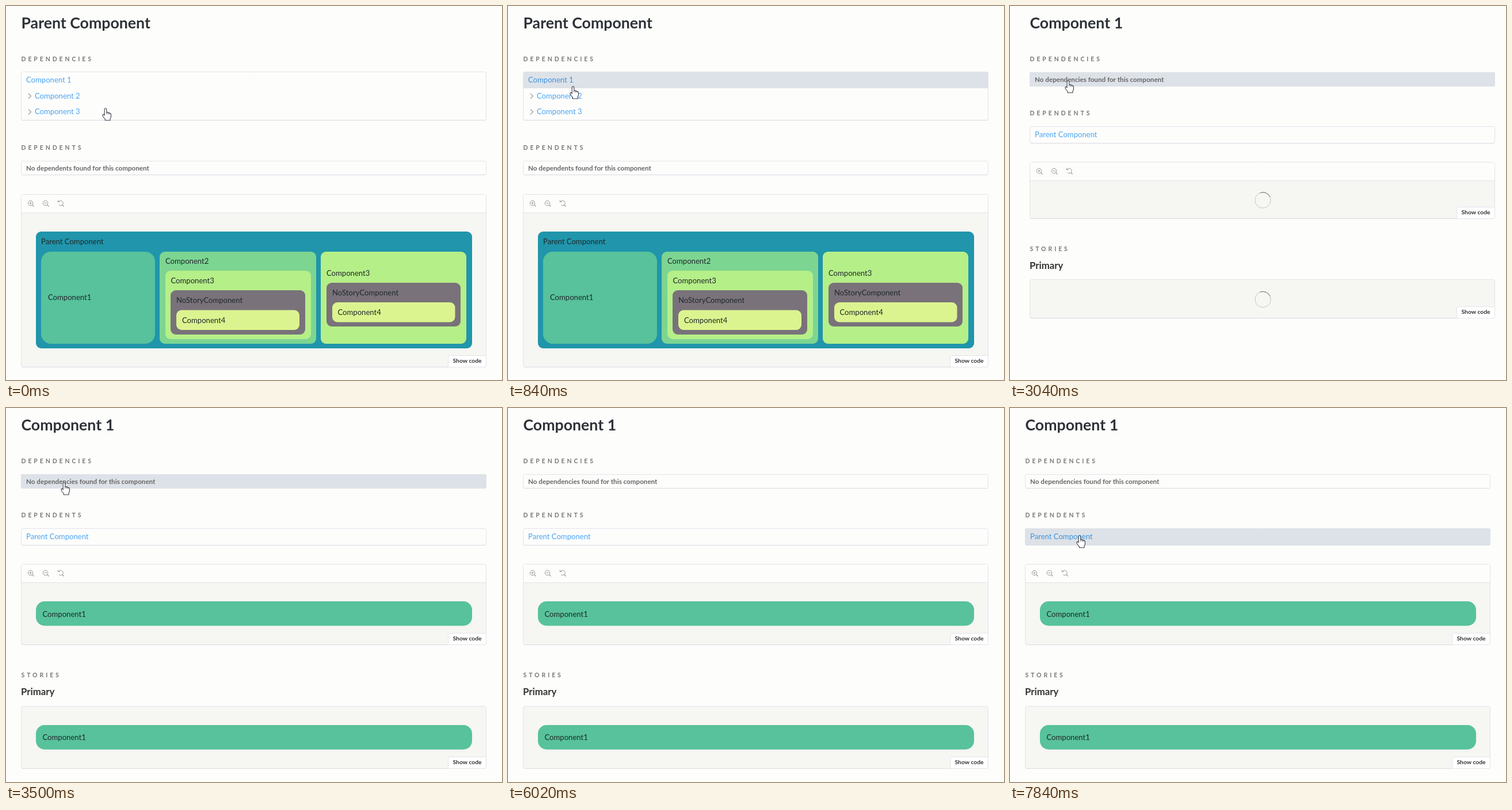
An HTML page with a canvas that plays this animation: 862 by 650 pixels, repeating every 8000 ms.

```html
<!DOCTYPE html>
<html lang="en">
<head>
<meta charset="utf-8">
<title>Component dependencies</title>
<style>
html, body { margin: 0; width: 100%; height: 100%; overflow: hidden; background: #fdfdfb; }
canvas { display: block; }
</style>
</head>
<body>
<canvas id="stage" width="862" height="650"></canvas>
<script>
const ctx = document.getElementById('stage').getContext('2d');
const LOOP = 8000;
const FONT = 'Lato, "Open Sans", sans-serif';
const C = {
  page: '#fdfdfb', panel: '#f6f6f3', card: '#fdfdfc', border: '#e4e4ec', shade: '#d9d9e4',
  hover: '#dde2e8', ink: '#2e3238', text: '#333333', muted: '#666666', label: '#777777',
  link: '#4ba5f2', linkHover: '#3f92dc', icon: '#999999',
  teal: '#2095ab', sea: '#57c29b', green: '#7dd592', lime: '#b5ef88', gray: '#79727a', lemon: '#dcf48f'
};

// time, x, y of the fingertip
const PATH = [
  [0, 173, 178], [120, 173, 178], [400, 121, 147], [540, 121, 147], [1240, 101, 130],
  [5020, 101, 130], [5300, 70, 150], [5720, -20, 196], [6139, -20, 225],
  [6140, 116, 224], [7260, 116, 224], [7800, 121, 222]
];

let now = 0, tip = { x: 0, y: 0 };

function cursorAt(t) {
  const s = Math.max(0, Math.floor((t - 120) / 140) * 140 + 120);
  let i = PATH.length - 1;
  while (i > 0 && PATH[i][0] > s) i--;
  const a = PATH[i], b = PATH[i + 1] || a;
  const k = b === a ? 0 : (s - a[0]) / (b[0] - a[0]);
  return { x: a[1] + (b[1] - a[1]) * k, y: a[2] + (b[2] - a[2]) * k };
}

function text(str, x, y, size, color, weight = 400, spacing = 0) {
  ctx.font = `${weight} ${size}px ${FONT}`;
  ctx.letterSpacing = spacing + 'px';
  ctx.fillStyle = color;
  ctx.fillText(str, x, y);
}

function box(x, y, x2, y2, r, fill, stroke) {
  ctx.beginPath();
  ctx.roundRect(x, y, x2 - x, y2 - y, r);
  ctx.fillStyle = fill;
  ctx.fill();
  if (stroke) {
    ctx.strokeStyle = stroke;
    ctx.lineWidth = 1;
    ctx.stroke();
  }
}

function line(color, width, ...pts) {
  ctx.beginPath();
  for (let i = 0; i < pts.length; i += 2) ctx.lineTo(pts[i], pts[i + 1]);
  ctx.strokeStyle = color;
  ctx.lineWidth = width;
  ctx.stroke();
}

function frame(x, y, y2, fill = C.card) {
  box(x + .5, y + .5, x + 808.5, y2 - .5, 3, fill, C.border);
  line(C.shade, 1, x + 2, y2 - .5, x + 807, y2 - .5);
}

const label = (str, x, y) => text(str, x, y + 4, 10.5, C.label, 700, 3.9);
const title = (str, x) => text(str, x, 39, 26.7, C.ink, 700);
const isHover = (y, y2) => now >= 140 && tip.x > 26 && tip.y >= y && tip.y < y2;

function hoverBar(x, y, y2) {
  const on = isHover(y, y2);
  if (on) box(x, y, x + 809, y2, 2, C.hover);
  return on;
}

function linkRow(str, x, y, y2, nested) {
  const on = hoverBar(x, y, y2), mid = (y + y2) / 2 - .5;
  if (nested) line(C.icon, 1.1, x + 13, mid - 4, x + 17.5, mid + .5, x + 13, mid + 5);
  text(str, x + (nested ? 24 : 9), mid + 4.5, 13.1, on ? C.linkHover : C.link);
}

function emptyRow(str, x, y) {
  frame(x, y, y + 25);
  hoverBar(x, y, y + 25);
  text(str, x + 9, y + 16.5, 11.65, C.muted, 700);
}

function lens(x, y) {
  ctx.strokeStyle = C.icon;
  ctx.lineWidth = 1;
  ctx.beginPath();
  ctx.arc(x, y, 4.2, 0, 7);
  ctx.stroke();
  line(C.icon, 1.2, x + 3, y + 3, x + 6, y + 6);
  line(C.icon, 1, x - 2, y, x + 2, y);
}

function toolbar(x, y) {
  box(x + 1, y + 1, x + 808, y + 32, 2, C.card);
  line(C.border, 1, x + 1, y + 32.5, x + 808, y + 32.5);
  const cy = y + 15.5;
  lens(x + 16.5, cy);
  line(C.icon, 1, x + 16.5, cy - 2, x + 16.5, cy + 2);
  lens(x + 42.5, cy);
  ctx.beginPath();
  ctx.arc(x + 69, cy, 4.2, -2.6, 2.4);
  ctx.stroke();
  line(C.icon, 1.2, x + 72, cy + 3, x + 74.5, cy + 6);
  line(C.icon, 1.1, x + 64.5, cy - 5, x + 64.5, cy - 2, x + 67.5, cy - 2);
}

function codeTab(x, y2) {
  box(x + 742.5, y2 - 20.5, x + 808.5, y2 - .5, [3, 0, 3, 0], '#ffffff', C.border);
  text('Show code', x + 750.5, y2 - 8, 10.3, C.text, 700);
}

function canvasPanel(x, y, y2, hasTools) {
  frame(x, y, y2, C.panel);
  if (hasTools) toolbar(x, y);
  codeTab(x, y2);
}

function block(str, x, y, x2, y2, color, tx, ty, r = 9) {
  box(x, y, x2, y2, r, color);
  text(str, tx, ty + 4.5, 13.1, '#20282b');
}

function spinner(x, y) {
  const a = -1.2 + (now - 3040) / 700 * Math.PI * 2;
  ctx.lineWidth = 1;
  ctx.strokeStyle = '#c6c6bf';
  ctx.beginPath();
  ctx.arc(x, y, 13.7, 0, 7);
  ctx.stroke();
  ctx.strokeStyle = '#707070';
  ctx.beginPath();
  ctx.arc(x, y, 13.7, a - .75, a + .8);
  ctx.stroke();
}

function parentPage() {
  const x = 26.5;
  title('Parent Component', x);
  label('DEPENDENCIES', x, 92);
  frame(26, 114, 199);
  linkRow('Component 1', 26, 115, 143);
  linkRow('Component 2', 26, 143, 170, true);
  linkRow('Component 3', 26, 170, 198, true);
  label('DEPENDENTS', x, 245.5);
  emptyRow('No dependents found for this component', 26, 269);
  canvasPanel(26, 327, 628, true);

  block('Parent Component', 52, 392, 810, 595, C.teal, 61, 409);
  block('Component1', 61, 427, 259, 587, C.sea, 73, 506, 17);
  block('Component2', 267, 427, 539, 587, C.green, 277, 443);
  block('Component3', 277, 460, 530, 579, C.lime, 286.5, 477.5);
  block('NoStoryComponent', 286, 494, 520, 571, C.gray, 296, 511.5);
  block('Component4', 296, 528.5, 510, 563, C.lemon, 306, 546);
  block('Component3', 547, 427, 800, 587, C.lime, 557, 464);
  block('NoStoryComponent', 557, 481, 790, 557, C.gray, 567, 498);
  block('Component4', 567, 515, 780.5, 549.5, C.lemon, 576.5, 532.5);
}

function childPage(loading) {
  const x = loading ? 34 : 26;
  title('Component 1', x + .5);
  label('DEPENDENCIES', x + .5, 92);
  emptyRow('No dependencies found for this component', x, 115);
  label('DEPENDENTS', x + .5, 186);
  frame(x, 209, 239);
  linkRow('Parent Component', x, 209.5, 238.5);

  const end = loading ? 370 : 412;
  canvasPanel(x, 271, end, true);
  label('STORIES', x + .5, end + 52);
  text('Primary', x, end + 87, 16.8, C.text, 700);
  if (loading) {
    canvasPanel(x, 475, 543);
    spinner(439.5, 337.5);
    spinner(439.5, 510);
  } else {
    canvasPanel(x, 518, 627);
    block('Component1', 52, 336, 810, 378.5, C.sea, 63.5, 358, 15);
    block('Component1', 52, 551, 810, 593.5, C.sea, 63.5, 572, 15);
  }
}

function hand({ x, y }) {
  ctx.save();
  ctx.translate(x, y);
  ctx.lineJoin = 'round';
  ctx.fillStyle = '#ffffff';
  ctx.strokeStyle = '#3c3c48';
  ctx.lineWidth = 1.1;
  const p = new Path2D('M-1.8 12V1.5Q-1.5-.3 0-.3Q1.6-.3 1.8 1.5V7Q3.6 6 4.6 7.6Q6.2 6.9 7 8.4Q9.4 8 9.5 10.5V14Q9.3 16.5 8 18V20.8H-.7V18.6Q-3.5 16-5 12.6Q-5.4 10.4-3.7 10.3Q-2.6 10.5-1.8 12Z');
  ctx.fill(p);
  ctx.stroke(p);
  line('#3c3c48', .8, 1.8, 7, 1.8, 10);
  line('#3c3c48', .8, 4.6, 7.6, 4.6, 10.3);
  line('#3c3c48', .8, 7, 8.4, 7, 10.6);
  ctx.restore();
}

function draw(t) {
  now = t;
  tip = cursorAt(t);
  ctx.fillStyle = C.page;
  ctx.fillRect(0, 0, 862, 650);
  if (t < 3040) parentPage();
  else childPage(t < 3500);
  hand(tip);
}

let start = 0;
function tick(ts) {
  draw((ts - start) % LOOP);
  requestAnimationFrame(tick);
}
requestAnimationFrame(ts => { start = ts; tick(ts); });
</script>
</body>
</html>
```
